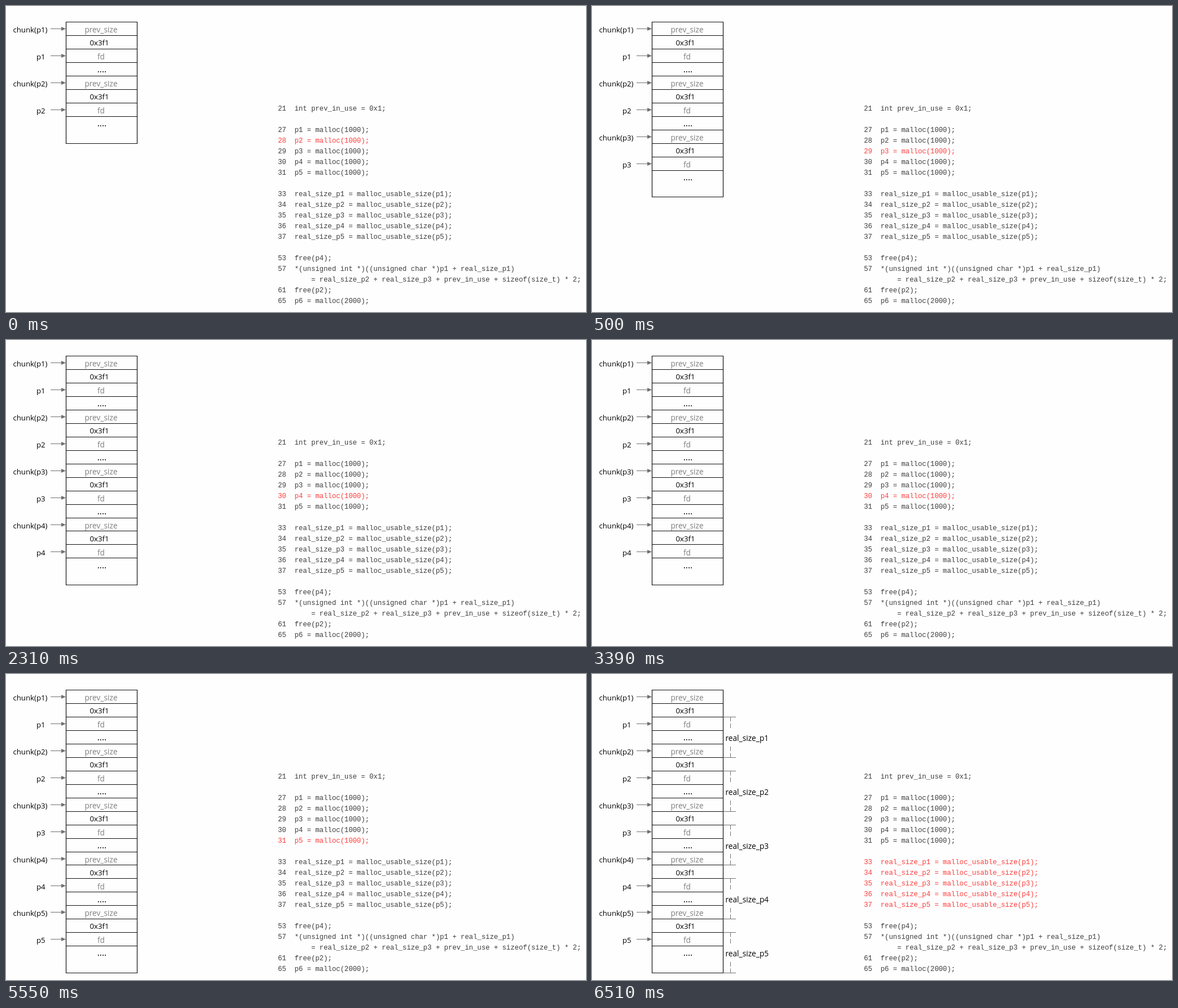
An HTML page for the animation above (8000 ms loop, 1028 px wide and 544 px high).

```html
<!DOCTYPE html>
<html lang="en">
<head>
<meta charset="utf-8">
<title>Heap chunks</title>
<style>
  html, body { margin: 0; width: 100%; height: 100%; overflow: hidden; background: #fefefe; }
  svg { display: block; }
  text { font: 13.7px "Open Sans", "Noto Sans", sans-serif; fill: #000; white-space: pre; }
  .middle { text-anchor: middle; }
  .muted { fill: #7f7f7f; }
  .small { font-size: 13.2px; }
  .dots { font-size: 15.5px; }
  .code { font: 12.28px "Liberation Mono", monospace; fill: #3c3c3c; }
  .active { fill: #ff3b3b; }
  .cell { fill: none; stroke: #111; stroke-width: 1.2; }
  .thin { fill: none; stroke: #707070; stroke-width: 1; }
  .dash { stroke-dasharray: 8 3.5; }
  .head { fill: #707070; }
</style>
</head>
<body>
<svg id="stage" width="1028" height="544" viewBox="0 0 1028 544"></svg>
<script>
const LOOP = 8000;
const ROW = 23.96;
const LEFT = 106.5, RIGHT = 232.5;

const steps = [
  { at: 0, chunks: 2, lines: [28] },
  { at: 500, chunks: 3, lines: [29] },
  { at: 2310, chunks: 4, lines: [30] },
  { at: 4110, chunks: 5, lines: [31] },
  { at: 6510, chunks: 5, lines: [33, 34, 35, 36, 37], sizes: true },
];

const ids = [1, 2, 3, 4, 5];
const code = [
  "21  int prev_in_use = 0x1;",
  "",
  ...ids.map(n => `${26 + n}  p${n} = malloc(1000);`),
  "",
  ...ids.map(n => `${32 + n}  real_size_p${n} = malloc_usable_size(p${n});`),
  "",
  "53  free(p4);",
  "57  *(unsigned int *)((unsigned char *)p1 + real_size_p1)",
  "        = real_size_p2 + real_size_p3 + prev_in_use + sizeof(size_t) * 2;",
  "61  free(p2);",
  "65  p6 = malloc(2000);",
];

const text = (x, y, content, cls = "") => `<text x="${x}" y="${y}" class="${cls}">${content}</text>`;
const path = (d, cls) => `<path d="${d}" class="${cls}"/>`;
const arrow = y => path(`M79 ${y}H99`, "thin") + path(`M98 ${y - 3.5}L106 ${y}L98 ${y + 3.5}Z`, "head");

// Row edges sit on pixel centres so that the rules stay sharp.
const rowY = row => Math.round(28 + row * ROW) + 0.5;

function table(chunks) {
  const rows = chunks * 4;
  const bottom = rowY(rows + 1);
  let rules = "";
  for (let row = 1; row < rows; row++) rules += `M${LEFT} ${rowY(row)}H${RIGHT}`;
  return path(`M${LEFT} ${rowY(0)}H${RIGHT}V${bottom}H${LEFT}Z${rules}`, "cell");
}

function chunkText(n) {
  const y = rowY((n - 1) * 4);
  const mid = 169;
  return text(mid - 0.5, y + 18, "prev_size", "middle muted")
    + text(mid - 3.5, y + 41.5, "0x3f1", "middle small")
    + text(mid - 0.5, y + 66, "fd", "middle muted")
    + text(mid + 1, y + 89.5, "....", "middle dots")
    + text(12.5, y + 18.5, `chunk(p${n})`, "small") + arrow(y + 12)
    + text(54, y + 66.5, `p${n}`, "small") + arrow(y + 60);
}

function sizeBracket(n) {
  const row = (n - 1) * 4 + 2;
  const top = rowY(row), bottom = rowY(row + 3);
  return path(`M${RIGHT} ${top}H255M${RIGHT} ${bottom}H255`, "thin")
    + path(`M245.5 ${top}V${top + 23}M245.5 ${bottom}V${bottom - 23}`, "thin dash")
    + text(236.5, top + 42.5, `real_size_p${n}`);
}

function codeLine(line, i, active) {
  const cls = active.includes(parseInt(line)) ? "code active" : "code";
  return text(482, 185.5 + i * 19.03, line, cls);
}

function draw({ chunks, lines, sizes }) {
  const shown = ids.slice(0, chunks);
  stage.innerHTML = table(chunks)
    + shown.map(chunkText).join("")
    + (sizes ? shown.map(sizeBracket).join("") : "")
    + code.map((line, i) => codeLine(line, i, lines)).join("");
}

const stage = document.getElementById("stage");
const start = performance.now();
let current;

function tick() {
  const time = (performance.now() - start) % LOOP;
  const step = steps.findLast(s => s.at <= time);
  if (step !== current) draw(current = step);
  requestAnimationFrame(tick);
}
tick();
</script>
</body>
</html>
```
